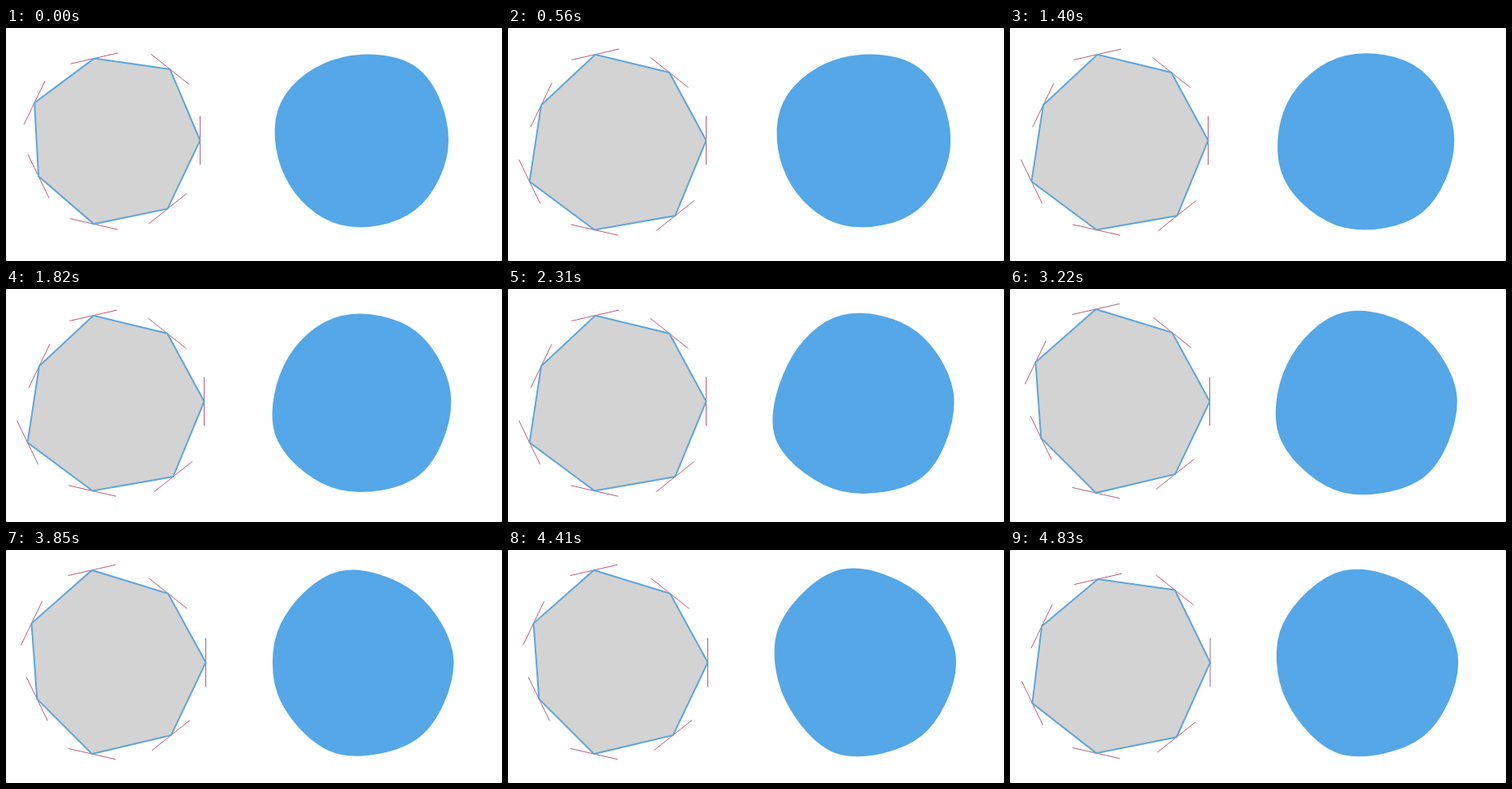
An HTML page with a canvas that plays this animation: 612 by 288 pixels, repeating every 4900 ms.

```html
<!DOCTYPE html>
<html lang="en">
<head>
<meta charset="utf-8">
<title>Morphing blob</title>
<style>
  html, body { margin: 0; height: 100%; overflow: hidden; background: #999; }
  canvas { display: block; border-radius: 2px; }
</style>
</head>
<body>
<canvas id="stage" width="612" height="288"></canvas>
<script>
const ctx = document.getElementById('stage').getContext('2d');
const LOOP = 4900, STEP = 70, FIRST = 510, MORPH = 2000;
const CENTER_X = 132, CENTER_Y = 139, HANDLE = 30, SHIFT = 305.3;
const BLUE = '#55a7e7';

// Distance of each corner from the centre, counter-clockwise from the right
const poses = [
  [107.5, 112.7, 104, 107.5, 102, 106, 108],
  [112.5, 107.5, 109, 101, 117, 113.4, 119],
  [114.5, 109, 117, 111.5, 104, 116, 115],
  [115, 114.5, 105.7, 103, 116, 115, 118]
];

// Corner i of a heptagon, with the ends of its tangent
function corner(radius, i) {
  const angle = i * 2 * Math.PI / 7;
  const cos = Math.cos(angle), sin = Math.sin(angle);
  const x = CENTER_X + radius * cos, y = CENTER_Y - radius * sin;
  const dx = HANDLE * sin, dy = HANDLE * cos;
  return { at: [x, y], ahead: [x - dx, y - dy], behind: [x + dx, y + dy] };
}

function paint(fill, stroke, width) {
  ctx.closePath();
  ctx.fillStyle = fill;
  ctx.strokeStyle = stroke;
  ctx.lineWidth = width;
  ctx.fill();
  ctx.stroke();
}

function drawPolygon(corners) {
  ctx.beginPath();
  for (const c of corners) {
    ctx.moveTo(...c.behind);
    ctx.lineTo(...c.ahead);
  }
  ctx.strokeStyle = '#b4607a';
  ctx.lineWidth = 1;
  ctx.stroke();

  ctx.beginPath();
  for (const c of corners) ctx.lineTo(...c.at);
  paint('#d3d3d3', '#5ea6da', 2);
}

function drawBlob(corners) {
  ctx.beginPath();
  ctx.moveTo(...corners[0].at);
  corners.forEach((c, i) => {
    const next = corners[(i + 1) % corners.length];
    ctx.bezierCurveTo(...c.ahead, ...next.behind, ...next.at);
  });
  paint(BLUE, BLUE, 2.5);
}

// The polygon jumps to each pose; the blob follows it at constant speed
function draw(time) {
  const t = Math.floor(time % LOOP / STEP) * STEP;
  const phase = Math.max(0, (t - FIRST) / MORPH + 1);
  const index = Math.floor(phase), mix = phase - index;
  const target = poses[index], from = poses[Math.max(0, index - 1)];

  ctx.fillStyle = '#fff';
  ctx.fillRect(0, 0, 612, 288);
  drawPolygon(target.map(corner));
  ctx.save();
  ctx.translate(SHIFT, 0);
  drawBlob(target.map((r, i) => corner(from[i] + (r - from[i]) * mix, i)));
  ctx.restore();
}

const start = performance.now();
function tick() {
  draw(performance.now() - start);
  requestAnimationFrame(tick);
}
tick();
</script>
</body>
</html>
```
